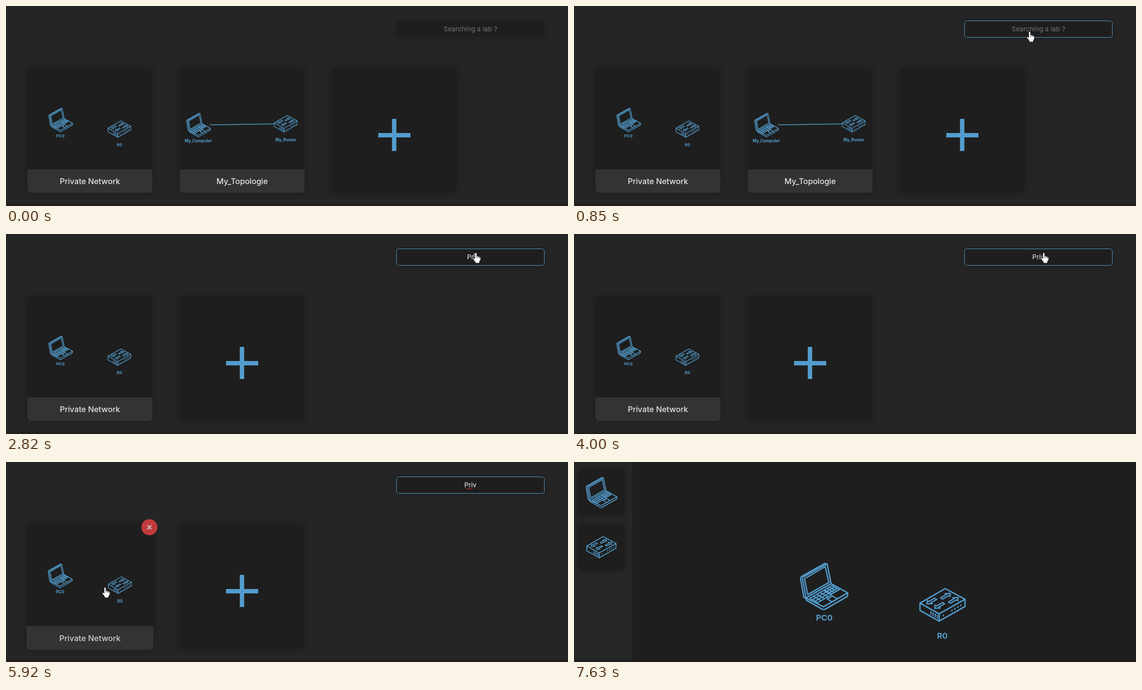
Recreate the animation shown at these times as an HTML page with a canvas. Size 1152 px wide and 411 px high, loop 8.22 s.

```html
<!DOCTYPE html>
<html lang="en">
<head>
<meta charset="utf-8">
<title>Labs</title>
<style>
  html, body { margin: 0; width: 100%; height: 100%; overflow: hidden; background: #252525; }
  canvas { display: block; width: 1152px; height: 411px; }
</style>
</head>
<body>
<canvas id="stage" width="1152" height="411"></canvas>
<script>
const ctx = document.getElementById('stage').getContext('2d');
const LOOP = 8220, STEP = 65.76, LEAD = 14;
const BLUE = '#539dce', PAGE = '#252525', DARK = '#1e1e1e';
const FONT = 'Inter, "Open Sans", sans-serif';

const clamp = v => Math.max(0, Math.min(1, v));
const smooth = u => u * u * (3 - 2 * u);
const mix = (a, b, u) => [a[0] + (b[0] - a[0]) * u, a[1] + (b[1] - a[1]) * u];

// ---------- drawing helpers ----------
function rect(x, y, w, h, color) {
  ctx.fillStyle = color;
  ctx.fillRect(x, y, w, h);
}

function panel(x, y, w, h, r, blur) {
  ctx.save();
  ctx.shadowColor = 'rgba(0,0,0,.25)';
  ctx.shadowBlur = blur;
  ctx.fillStyle = DARK;
  ctx.beginPath();
  ctx.roundRect(x, y, w, h, r);
  ctx.fill();
  ctx.restore();
}

function text(str, x, y, size, weight, color) {
  ctx.font = `${weight} ${size}px ${FONT}`;
  ctx.textAlign = 'center';
  ctx.fillStyle = color;
  ctx.fillText(str, x, y);
}

function poly(pts, close) {
  ctx.beginPath();
  pts.forEach(p => ctx.lineTo(p[0], p[1]));
  if (close) ctx.closePath();
  ctx.stroke();
}

function seg(x1, y1, x2, y2) {
  poly([[x1, y1], [x2, y2]]);
}

function grid(x, y, [ux, uy], [vx, vy], cols, rows) {
  for (let i = 0; i <= cols; i++) {
    const a = i / cols;
    seg(x + ux * a, y + uy * a, x + ux * a + vx, y + uy * a + vy);
  }
  for (let i = 0; i <= rows; i++) {
    const b = i / rows;
    seg(x + vx * b, y + vy * b, x + vx * b + ux, y + vy * b + uy);
  }
}

function icon(x, y, s, paint) {
  ctx.save();
  ctx.translate(x, y);
  ctx.scale(s, s);
  ctx.strokeStyle = BLUE;
  ctx.lineWidth = 2.6;
  ctx.lineJoin = ctx.lineCap = 'round';
  paint();
  ctx.restore();
}

function laptop() {
  // lid
  poly([[12, 73], [8, 71], [1.3, 32], [3, 28.5], [51, 1.3], [56, 2.5], [64, 43]]);
  poly([[12, 70], [5.2, 32], [6.5, 29.5], [54.5, 3]]);
  poly([[9.5, 33], [52, 8], [59.5, 40.5], [16, 65.5]], true);
  // base
  poly([[12, 72.5], [64, 43], [98, 62], [48.5, 90.5]], true);
  poly([[12, 72.5], [14, 77.5], [46.5, 96], [51, 96], [97, 69.5], [98, 67], [98, 62]]);
  // keys and touchpad
  ctx.lineWidth = 2.4;
  grid(20.5, 73, [28, -16], [16, 9], 4, 3);
  grid(50.5, 55.5, [15, -8.5], [15, 8.5], 3, 3);
  poly([[56, 74.5], [67, 68.5], [77, 74], [66, 80.5]], true);
}

function arrow(x, y, dir) {
  const shape = [[-11, -2.4], [3, -2.4], [3, -6], [10, 0], [3, 6], [3, 2.4], [-11, 2.4]];
  poly(shape.map(([a, b]) => [x + dir * .87 * (a + b), y + dir * .5 * (b - a)]), true);
}

function router() {
  poly([[1.2, 31], [53, 1.2], [93.5, 23], [40.5, 53]], true);
  poly([[1.2, 31], [1.2, 46], [40.5, 68], [93.5, 38], [93.5, 23]]);
  seg(40.5, 53, 40.5, 68);
  ctx.lineWidth = 2.4;
  arrow(55, 16, 1);
  arrow(71, 24.5, 1);
  arrow(24, 27.5, -1);
  arrow(40, 36.5, -1);
  for (let i = 0; i < 4; i++) {
    seg(23.5 + i * 4.5, 48.5 + i * 2.5, 23.5 + i * 4.5, 54 + i * 2.5);
    seg(66.3 + i * 6.1, 47 - i * 3.6, 67.3 + i * 6.1, 45 - i * 3.6);
  }
  seg(49, 57, 49.7, 55.7);
}

function cursor(x, y, shape) {
  ctx.save();
  ctx.translate(x, y);
  ctx.fillStyle = '#fff';
  ctx.strokeStyle = '#111';
  ctx.lineWidth = 1;
  ctx.fill(shape);
  ctx.stroke(shape);
  ctx.restore();
}

const HAND = new Path2D('M-2 1.5Q0-1 2 1.5V7Q4.6 6 5 8Q7.2 7 7.6 9Q10 8.6 10 11V15L7.5 19V22H-1V19.5L-6 13Q-6.2 10 -4 11L-2 13Z'
  + 'M2 7V11M5 8V11M7.6 9V12');
const POINTER = new Path2D('M0 0V16L3.7 12.6L6.2 18.3L8.3 17.4L5.9 11.8L11 11.6Z');

// ---------- state, all from the step k ----------
const OPEN = 97;
const SEARCH = { x: 800, y: 30, w: 304, h: 35 };
const slot = i => ({ x: 44 + 312 * i, y: 128, w: 256, h: 256 });

function cursorAt(k) {
  const bar = [934, 52], bar2 = [963, 38], lab = [203, 257], edit = [200.5, 256.5];
  if (k < 4 || k >= 116) return null;
  if (k < 26) return mix([884, 357], bar, 1 - (1 - clamp((k - 4) / 9)) ** 3);
  if (k < OPEN) return mix(bar2, lab, smooth(clamp((k - 82) / 6)));
  return mix(edit, [1013, 411], smooth(clamp((k - 108) / 8)));
}

const inside = (p, b) => !!p && p[0] >= b.x && p[0] < b.x + b.w && p[1] >= b.y && p[1] < b.y + b.h;

// hover fades over three steps
function hover(k, box) {
  let n = 0;
  for (let j = 0; j < 3; j++) n += inside(cursorAt(k - j), box);
  return n / 3;
}

const typed = k => 'Priv'.slice(0, [39, 43, 58, 61].filter(s => k >= s).length);
const caretOn = k => (k >= 21 && k < 29) || (k >= 37 && k < 52) || (k >= 58 && k < 61);

// ---------- labs page ----------
function privateLab(x) {
  icon(x + 43, 209.5, .505, laptop);
  icon(x + 164.5, 235.5, .505, router);
  text('PC0', x + 67.5, 269.8, 8.2, 700, BLUE);
  text('R0', x + 188.5, 288, 8.2, 700, BLUE);
}

function linkedLab(x) {
  ctx.strokeStyle = BLUE;
  ctx.lineWidth = 1.4;
  seg(x + 63, 244.3, x + 193, 242.3);
  icon(x + 13.5, 220, .505, laptop);
  icon(x + 193.5, 224.5, .505, router);
  text('My_Computer', x + 38.3, 280, 8.3, 700, BLUE);
  text('My_Router', x + 217.6, 277.5, 8.3, 700, BLUE);
}

function plus(x) {
  rect(x + 95, 261, 66, 9, BLUE);
  rect(x + 123.2, 232, 9, 66, BLUE);
}

function closeButton(x, alpha) {
  ctx.globalAlpha = alpha;
  ctx.fillStyle = '#c13b3c';
  ctx.beginPath();
  ctx.arc(x + 248, 136, 16.2, 0, 7);
  ctx.fill();
  ctx.strokeStyle = '#cdb4b4';
  ctx.lineWidth = 2.5;
  seg(x + 244, 132, x + 252, 140);
  seg(x + 252, 132, x + 244, 140);
  ctx.globalAlpha = 1;
}

const LABS = [
  { name: 'Private Network', paint: privateLab },
  { name: 'My_Topologie', paint: linkedLab },
  { paint: plus }
];
const isFiltered = k => k >= 43;
const shownLabs = k => LABS.filter(l => !isFiltered(k) || l.name !== 'My_Topologie');

function card(k, { name, paint }, box) {
  const h = hover(k, box), s = 1 + .016 * h, x = box.x;
  ctx.save();
  ctx.translate(x + 128, 256);
  ctx.scale(s, s);
  ctx.translate(-x - 128, -256);
  panel(x, 128, 256, 256, 8, 12);
  paint(x);
  if (name) {
    ctx.fillStyle = '#333331';
    ctx.beginPath();
    ctx.roundRect(x, 336, 256, 48, [0, 0, 8, 8]);
    ctx.fill();
    text(name, x + 128, 365.8, 16.1, 500, h > .5 ? '#d0d0d0' : '#e6e6e6');
    if (h) closeButton(x, h);
  }
  ctx.restore();
}

function searchBar(k) {
  const focus = k >= 21 ? 1 : hover(k, SEARCH);
  panel(801, 31, 302, 33, 4, 10);
  if (focus) {
    ctx.globalAlpha = focus;
    ctx.strokeStyle = BLUE;
    ctx.lineWidth = 1;
    ctx.beginPath();
    ctx.roundRect(800.5, 30.5, 303, 34, 5);
    ctx.stroke();
    ctx.globalAlpha = 1;
  }
  const str = typed(k);
  if (str) text(str, 952, 52, 13.6, 400, '#f4f4f4');
  else text('Searching a lab ?', 952, 52, 13.6, 400, '#757575');
  if (caretOn(k)) rect(Math.round(952 + (str ? ctx.measureText(str).width / 2 : 0)), 40, 1, 16, '#fff');
  if (k >= 77) {
    ctx.strokeStyle = '#c62a2e';
    ctx.lineWidth = 1.1;
    ctx.beginPath();
    for (let x = 942; x <= 957; x++) ctx.lineTo(x, 54.6 + .5 * Math.sin(x * 1.5));
    ctx.stroke();
  }
}

function labsPage(k) {
  rect(0, 0, 1152, 411, PAGE);
  if (isFiltered(k)) {
    ctx.fillStyle = 'rgba(0,0,0,.03)';
    ctx.beginPath();
    ctx.roundRect(660, 120, 272, 272, 12);
    ctx.fill();
  }
  shownLabs(k).forEach((lab, i) => card(k, lab, slot(i)));
  searchBar(k);
}

// ---------- editor page ----------
function editorPage() {
  rect(0, 0, 1152, 411, DARK);
  rect(0, 0, 120, 411, '#252626');
  panel(8, 15, 96, 95, 8, 8);
  panel(8, 127, 96, 95, 8, 8);
  icon(24, 31, .65, laptop);
  icon(25.3, 152.5, .65, router);
  icon(463, 207, 1, laptop);
  icon(708, 259, 1, router);
  text('PC0', 513, 326, 16.5, 700, BLUE);
  text('R0', 755, 363, 16.5, 700, BLUE);
}

function draw(k) {
  if (k < OPEN) labsPage(k);
  else editorPage();
  rect(0, 406.5, 1152, 5, 'rgba(30,20,22,.35)');

  const p = cursorAt(k);
  if (!p) return;
  const targets = [SEARCH, ...shownLabs(k).map((_, i) => slot(i))];
  const onLink = k < OPEN && targets.some(b => inside(p, b));
  cursor(...p, onLink ? HAND : POINTER);
}

const start = performance.now();
function tick() {
  const t = (performance.now() - start) % LOOP;
  draw(Math.floor((t + LEAD) / STEP));
  requestAnimationFrame(tick);
}
tick();
</script>
</body>
</html>
```
